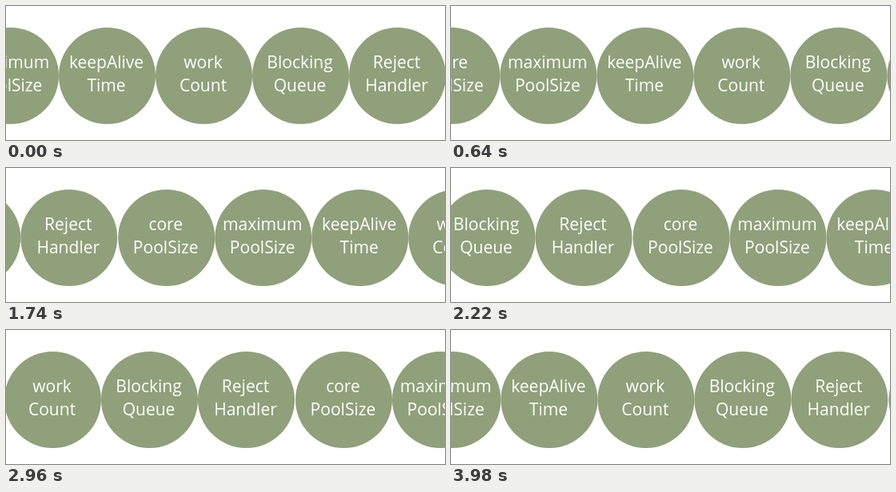
An HTML page with a canvas for the animation above (4000 ms loop, 549x168 px).

```html
<!DOCTYPE html>
<html lang="en">
<head>
<meta charset="utf-8">
<title>Thread pool parameters</title>
<style>
  html, body { margin: 0; width: 549px; height: 168px; overflow: hidden; background: #fff; }
  canvas { display: block; }
</style>
</head>
<body>
<canvas id="stage" width="549" height="168"></canvas>
<script>
const ctx = document.getElementById('stage').getContext('2d');
const LOOP = 4000, STEP = 20;
const RADIUS = 60.5, SPACING = 121, BELT = 727;
const START = -115.5, CENTER_Y = 87.5, EDGE = 61;

const labels = [
  ['core', 'PoolSize'],
  ['maximum', 'PoolSize'],
  ['keepAlive', 'Time'],
  ['work', 'Count'],
  ['Blocking', 'Queue'],
  ['Reject', 'Handler']
];

const wrap = (x) => ((x + EDGE) % BELT + BELT) % BELT - EDGE;

function drawDisc(x, [top, bottom]) {
  ctx.fillStyle = '#8fa07a';
  ctx.beginPath();
  ctx.arc(x, CENTER_Y, RADIUS, 0, Math.PI * 2);
  ctx.fill();
  ctx.fillStyle = '#fff';
  ctx.fillText(top, x - 1, 78);
  ctx.fillText(bottom, x - 1, 107);
}

function draw(time) {
  const t = Math.floor((time % LOOP) / STEP) * STEP;
  const shift = BELT * t / LOOP;
  ctx.fillStyle = '#fff';
  ctx.fillRect(0, 0, 549, 168);
  ctx.font = '21px "Open Sans", "Noto Sans", sans-serif';
  ctx.textAlign = 'center';
  ctx.textBaseline = 'alphabetic';
  labels.forEach((label, i) => drawDisc(wrap(START + i * SPACING + shift), label));
}

const begin = performance.now();
function tick() {
  draw(performance.now() - begin);
  requestAnimationFrame(tick);
}
tick();
</script>
</body>
</html>
```
